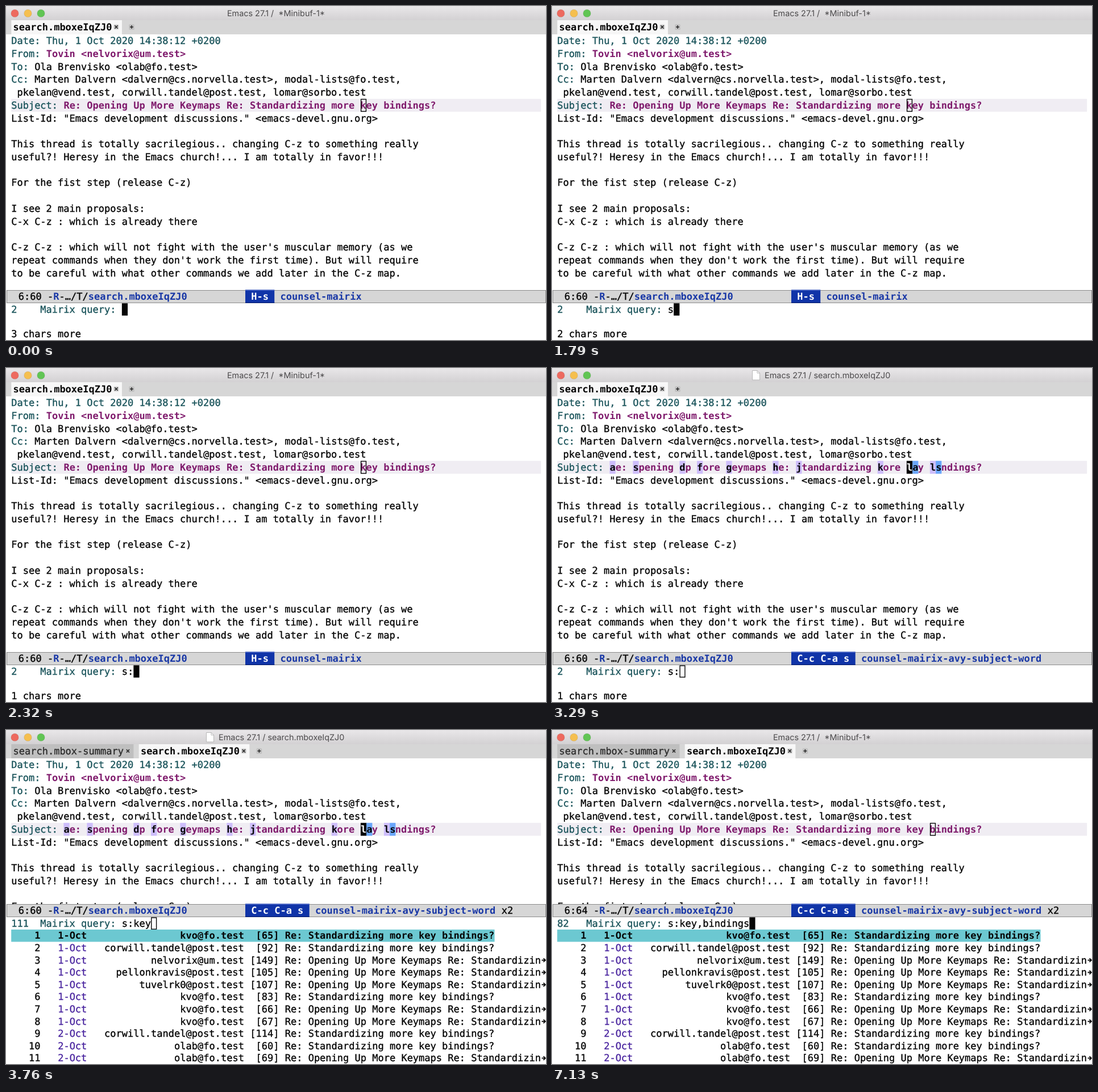
An HTML page for the animation above (8000 ms loop, 950x589 px).

```html
<!DOCTYPE html>
<html lang="en">
<head>
<meta charset="utf-8">
<title>Mail search</title>
<style>
  html, body { margin: 0; width: 100%; height: 100%; overflow: hidden; background: #fff; }
  svg { display: block; width: 950px; height: 589px; }
  text {
    font-family: "DejaVu Sans Mono", monospace;
    font-size: 17.017px;
    white-space: pre;
    text-rendering: geometricPrecision;
  }
  .medium { stroke-width: .35px; }
  .title { font-family: Inter, "Open Sans", sans-serif; font-size: 14.4px; text-anchor: middle; }
</style>
</head>
<body>
<svg id="stage" viewBox="0 0 950 589" xmlns="http://www.w3.org/2000/svg"></svg>
<script>
const CHAR = 10.245, LEFT = 9.2, BODY_TOP = 50, BODY_ROW = 22.75, MINI_ROW = 21.6;
const BLACK = '#050505', TEAL = '#19535a', PLUM = '#7f1a6c', BLUE = '#1837a6',
      VIOLET = '#4a259f', LAVENDER = '#cdbdfb', SKY = '#6aa6fb';
const LOOP = 8000;

const SUBJECT = 'Re: Opening Up More Keymaps Re: Standardizing more key bindings?';
const HINTED = 'ae: spening dp fore geymaps he: jtandardizing kore lay lsndings?';
const SHORT = 'Re: Standardizing more key bindings?';
const LONG = 'Re: Opening Up More Keymaps Re: Standardizin';

const BODY = [
  'This thread is totally sacrilegious.. changing C-z to something really',
  'useful?! Heresy in the Emacs church!... I am totally in favor!!!',
  '',
  'For the fist step (release C-z)',
  '',
  'I see 2 main proposals:',
  'C-x C-z : which is already there',
  '',
  "C-z C-z : which will not fight with the user's muscular memory (as we",
  "repeat commands when they don't work the first time). But will require",
  'to be careful with what other commands we add later in the C-z map.'
];

const RESULTS = [
  ['kvo@fo.test', 65], ['corwill.tandel@post.test', 92], ['nelvorix@um.test', 149, true],
  ['pellonkravis@post.test', 105, true], ['tuvelrk0@post.test', 107, true],
  ['kvo@fo.test', 83], ['kvo@fo.test', 66, true], ['kvo@fo.test', 67, true],
  ['corwill.tandel@post.test', 114], ['olab@fo.test', 60], ['olab@fo.test', 69, true]
];

const WORD = { key: 'C-c C-a s', command: 'counsel-mairix-avy-subject-word' };
const PLAIN = { key: 'H-s', command: 'counsel-mairix' };
const SCENES = [
  { at: 0, ...PLAIN, count: 2, query: '', note: 3, point: 60 },
  { at: 1000, ...PLAIN, count: 2, query: 's', note: 2, point: 60 },
  { at: 2320, ...PLAIN, count: 2, query: 's:', note: 1, point: 60 },
  { at: 2580, ...WORD, count: 2, query: 's:', note: 1, point: 60, hints: true },
  { at: 3760, ...WORD, count: 111, query: 's:key', results: true, point: 60, hints: true },
  { at: 7130, ...WORD, count: 82, query: 's:key,bindings', results: true, point: 64 }
];

const col = n => LEFT + n * CHAR;
const escape = s => String(s).replace(/&/g, '&amp;').replace(/</g, '&lt;').replace(/>/g, '&gt;');
const rect = (x, y, w, h, fill, more = '') =>
  `<rect x="${x}" y="${y}" width="${w}" height="${h}" fill="${fill}" ${more}/>`;
const line = (d, color, width = 1) =>
  `<path d="${d}" fill="none" stroke="${color}" stroke-width="${width}"/>`;
const text = (x, y, s, fill = BLACK, bold = false) => {
  const weight = bold ? 'font-weight="700"' : `class="medium" stroke="${fill}"`;
  return `<text x="${x}" y="${y}" fill="${fill}" xml:space="preserve" ${weight}>${escape(s)}</text>`;
};
const hollow = (x, y, h) =>
  rect(x + .7, y + .7, CHAR - 1.4, h - 1.4, 'none', `stroke="${BLACK}" stroke-width="1.4"`);

function titleBar(hints) {
  const lights = ['#ed6a5f', '#f5bf4f', '#61c554'].map((c, i) =>
    `<circle cx="${15.5 + 23 * i}" cy="12.9" r="6.7" fill="${c}" stroke="#0002" stroke-width=".7"/>`).join('');
  const page = hints
    ? `<path d="M352.5 4.5h8.5l4.5 4.5v12h-13z" fill="#fff" stroke="#aaa" stroke-width=".8"/>`
      + line('M361 4.5v4.5h4.5', '#aaa', .8)
    : '';
  const name = hints ? 'Emacs 27.1 / search.mboxeIqZJ0' : 'Emacs 27.1 /  *Minibuf-1*';
  return rect(0, 0, 950, 25, 'url(#bar)') + lights + page
    + `<text class="title" x="${hints ? 484.7 : 475}" y="18.2" fill="#4b494b" xml:space="preserve">${name}</text>`;
}

function tab(x, name, active) {
  const w = name.length * CHAR + 20.5, cx = x + w - 10;
  return rect(x, 25, w, 25, active ? '#f7f7f7' : '#bfbfbf')
    + text(x + 3.2, 43.4, name, active ? BLACK : '#2c2c2c', active)
    + rect(cx - 4.5, 32.5, 9, 9, active ? '#d2d2d2' : '#bfbfbf', 'rx="1.5"')
    + line(`M${cx - 2.6} 34.4l5.2 5.2m0 -5.2l-5.2 5.2`, '#2a2a2a', 1.5);
}

function tabBar(results) {
  const x = results ? 233.7 : 9.3, plus = x + 211.7;
  return rect(0, 25, 950, 25, '#d6d6d6')
    + (results ? tab(9.3, 'search.mbox-summary', false) : '')
    + tab(x, 'search.mboxeIqZJ0', true)
    + rect(plus - 4.8, 32.3, 9.6, 9.6, '#c2c2c2', 'rx="1.5"')
    + line(`M${plus - 3} 37h6m-3 -3v6`, '#2a2a2a', 1.5);
}

function subject(scene, top, base) {
  if (!scene.hints)
    return text(col(9), base, SUBJECT, PLUM, true) + hollow(col(scene.point), top, BODY_ROW);
  let out = '', plain = '';
  [...HINTED].forEach((c, i) => {
    const starts = SUBJECT[i] !== ' ' && (i === 0 || SUBJECT[i - 1] === ' ');
    const second = i === 52 || i === 56;
    if (!starts && !second) { plain += c; return; }
    plain += ' ';
    const cursor = i + 9 === scene.point;
    out += rect(col(i + 9), top, CHAR, BODY_ROW, cursor ? BLACK : second ? SKY : LAVENDER)
      + text(col(i + 9), base, c, cursor ? '#fff' : BLACK, true);
  });
  return out + text(col(9), base, plain, PLUM, true);
}

function message(scene) {
  const top = n => BODY_TOP + n * BODY_ROW, base = n => top(n) + 17.2;
  const header = (n, name, value, color, bold) =>
    text(LEFT, base(n), name, TEAL) + text(col(name.length + 1), base(n), value, color, bold);
  return header(0, 'Date:', 'Thu, 1 Oct 2020 14:38:12 +0200', TEAL)
    + header(1, 'From:', 'Tovin <nelvorix@um.test>', PLUM, true)
    + header(2, 'To:', 'Ola Brenvisko <olab@fo.test>')
    + header(3, 'Cc:', 'Marten Dalvern <dalvern@cs.norvella.test>, modal-lists@fo.test,')
    + text(col(1), base(4), 'pkelan@vend.test, corwill.tandel@post.test, lomar@sorbo.test')
    + rect(LEFT, top(5), 932, BODY_ROW, '#f0edf3')
    + text(LEFT, base(5), 'Subject:', TEAL) + subject(scene, top(5), base(5))
    + text(LEFT, base(6), 'List-Id: "Emacs development discussions." <emacs-devel.gnu.org>')
    + BODY.map((s, i) => text(LEFT, base(8 + i), s)).join('');
}

function modeLine(scene, y) {
  const base = y + 17.4, x = 21.8, keyX = 421, keyW = (scene.key.length + 2) * CHAR;
  const nameX = keyX + keyW + CHAR;
  return rect(1.5, y + .5, 948, 22, '#d6d6d6', 'stroke="#8b8b8b"')
    + text(x, base, `6:${scene.point} -`)
    + text(x + 6 * CHAR, base, 'R', BLUE, true)
    + text(x + 7 * CHAR, base, '-…/T/')
    + text(x + 12 * CHAR, base, 'search.mboxeIqZJ0', BLUE, true)
    + rect(keyX, y - .5, keyW, 23.5, '#1034a8')
    + line(`M${keyX} ${y + .2}h${keyW}`, '#4a67c6', 1.4)
    + line(`M${keyX} ${y + 22.4}h${keyW}`, '#0a2170', 1.4)
    + text(keyX + CHAR, base, scene.key, '#fff', true)
    + text(nameX, base, scene.command, BLUE, true)
    + (scene.results ? text(nameX + 32 * CHAR, base, 'x2') : '');
}

function resultRow([sender, size, long], i, top) {
  const y = top + (i + 1) * MINI_ROW, base = y + 16.5, first = i === 0;
  const put = (c, s, color) => text(col(c), base, s, color, first);
  const tag = `[${size}]`, mid = y + 10.8;
  return (first ? rect(LEFT, y, 83 * CHAR, MINI_ROW, '#6cc8d1') : '')
    + put(3, String(i + 1).padStart(2))
    + put(8, i < 8 ? '1-Oct' : '2-Oct', first ? BLACK : VIOLET)
    + put(40 - sender.length, sender)
    + put(46 - tag.length, tag)
    + put(47, long ? LONG : SHORT)
    + (long ? line(`M942.5 ${mid}h6m-3 -3.3l3.3 3.3l-3.3 3.3`, BLACK, 1.8) : '');
}

function minibuffer(scene, top) {
  const base = top + 16.9, x = col(19 + scene.query.length);
  return rect(0, top, 950, 589 - top, '#fff')
    + text(LEFT, base, String(scene.count).padEnd(5) + 'Mairix query:', TEAL)
    + text(col(19), base, scene.query)
    + (scene.hints ? hollow(x, top, MINI_ROW) : rect(x, top, CHAR, MINI_ROW, BLACK))
    + (scene.results
      ? RESULTS.map((r, i) => resultRow(r, i, top)).join('')
      : text(LEFT, top + 2 * MINI_ROW + 16.7, `${scene.note} chars more`));
}

function draw(scene) {
  const split = scene.results ? 307 : 501;
  return `<defs>
      <linearGradient id="bar" x2="0" y2="1"><stop stop-color="#e9e7e9"/><stop offset="1" stop-color="#d3d1d3"/></linearGradient>
      <clipPath id="body"><rect y="50" width="950" height="${split - 50}"/></clipPath>
    </defs>`
    + rect(0, 0, 950, 589, '#fff')
    + titleBar(scene.hints) + tabBar(scene.results)
    + `<g clip-path="url(#body)">${message(scene)}</g>`
    + minibuffer(scene, split + 23.3) + modeLine(scene, split);
}

const stage = document.getElementById('stage');
const start = performance.now();
let shown = null;

function render(t) {
  const scene = SCENES.filter(s => s.at <= t).pop();
  if (scene === shown) return;
  shown = scene;
  stage.innerHTML = draw(scene);
}

function tick() {
  render((performance.now() - start) % LOOP);
  requestAnimationFrame(tick);
}
tick();
</script>
</body>
</html>
```
